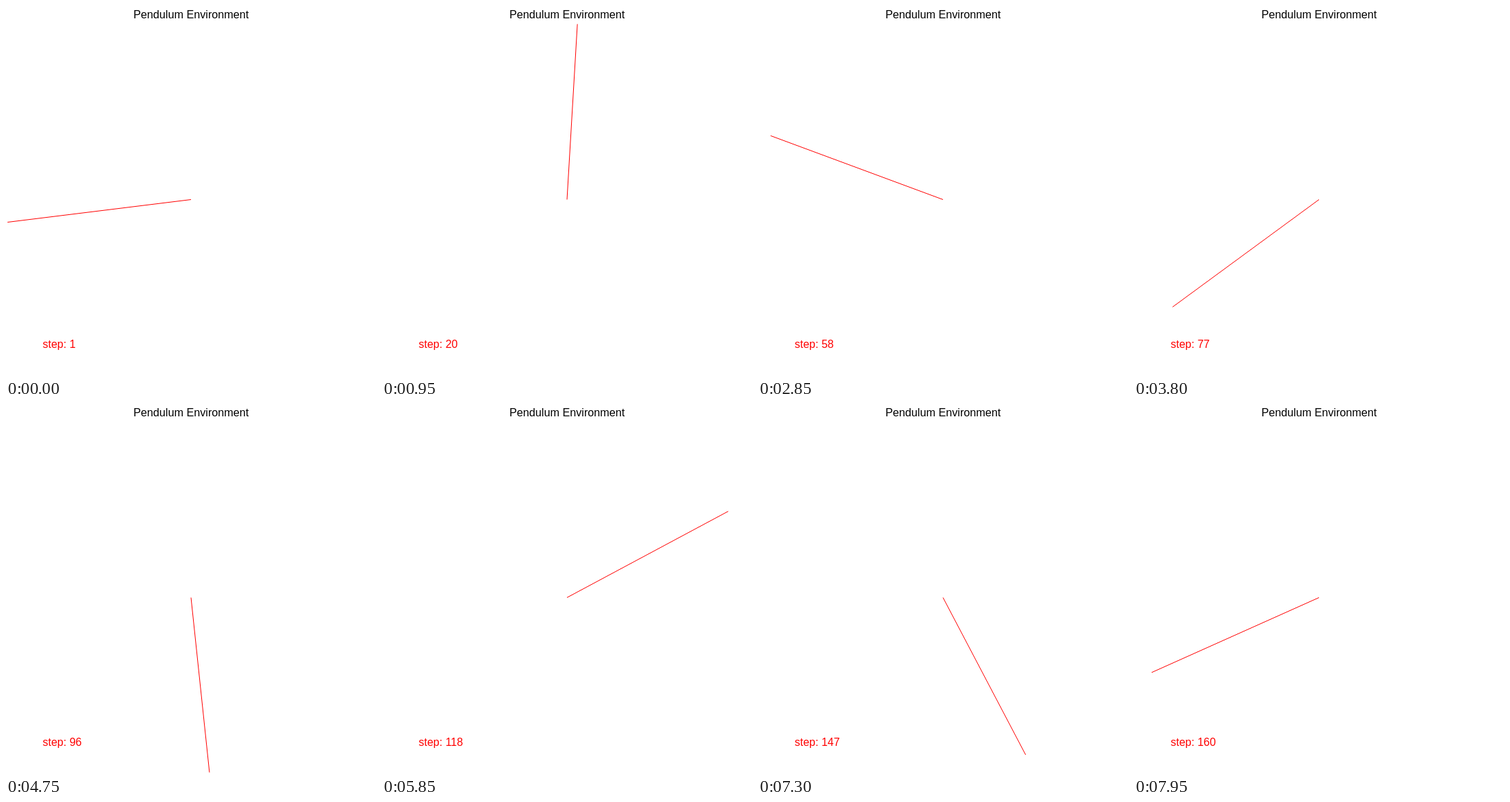
Recreate the animation shown at these times as an HTML page with a canvas. Size 540 px wide and 540 px high, loop 8000 ms.

```html
<!DOCTYPE html>
<html lang="en">
<head>
<meta charset="utf-8">
<title>Pendulum Environment</title>
<style>
  html, body { margin: 0; width: 100%; height: 100%; overflow: hidden; background: #fff; }
  canvas { display: block; width: 100vw; height: 100vh; }
</style>
</head>
<body>
<canvas id="stage" width="540" height="540"></canvas>
<script>
const ctx = document.getElementById("stage").getContext("2d");

const STEPS = 160, STEP_MS = 50;
const DT = 0.05, GRAVITY = 10, MAX_SPEED = 8, TORQUE = 1.982;
const PIVOT = { x: 270, y: 282.5 }, RADIUS = { x: 270, y: 256.5 };

// Driven pendulum; angles run counterclockwise from upright.
function simulate(angle, speed) {
  const angles = [angle];
  while (angles.length < STEPS) {
    speed += (1.5 * GRAVITY * Math.sin(angle) + 3 * TORQUE) * DT;
    angle += speed * DT;
    speed = Math.max(-MAX_SPEED, Math.min(MAX_SPEED, speed));
    angles.push(angle);
  }
  return angles;
}

const angles = simulate(97.4 * Math.PI / 180, -0.397);

function drawText(text, x, y, size, color) {
  ctx.font = `${size}px "Liberation Sans", Arial, sans-serif`;
  ctx.fillStyle = color;
  ctx.fillText(text, x, y);
}

function draw(index) {
  const angle = angles[index];
  ctx.fillStyle = "#fff";
  ctx.fillRect(0, 0, 540, 540);
  drawText("Pendulum Environment", 186, 18, 16.2, "#000");

  ctx.strokeStyle = "#f00";
  ctx.lineWidth = 1;
  ctx.beginPath();
  ctx.moveTo(PIVOT.x, PIVOT.y);
  ctx.lineTo(PIVOT.x - RADIUS.x * Math.sin(angle), PIVOT.y - RADIUS.y * Math.cos(angle));
  ctx.stroke();

  drawText(`step: ${index + 1}`, 53.5, 499, 16, "#f00");
}

const start = performance.now();
function tick() {
  const elapsed = performance.now() - start;
  draw(Math.floor(elapsed / STEP_MS) % STEPS);
  requestAnimationFrame(tick);
}
tick();
</script>
</body>
</html>
```
